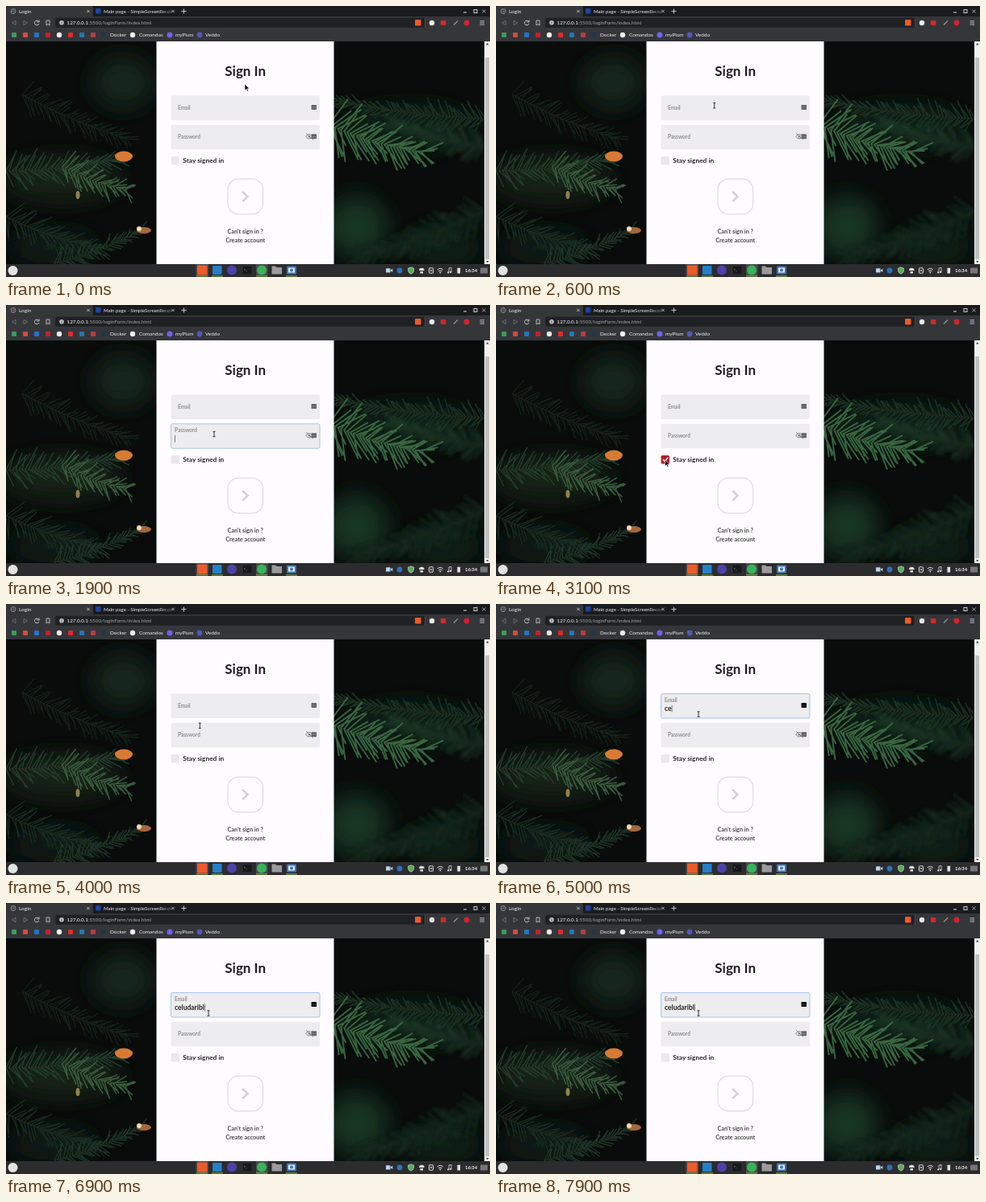
An HTML page for the animation above (8000 ms loop, 600 px wide and 337 px high).

```html
<!DOCTYPE html>
<html lang="en">
<head>
<meta charset="utf-8">
<title>Login</title>
<style>
  html, body { margin: 0; width: 100%; height: 100%; overflow: hidden; background: #090c0b; }
  svg { display: block; width: 100vw; height: 100vh; }
  text { font-family: Lato, "Open Sans", sans-serif; white-space: pre; }
</style>
</head>
<body>
<svg id="stage" viewBox="0 0 600 337" preserveAspectRatio="none">
  <defs>
    <clipPath id="photoArea"><rect y="44" width="594" height="277"/></clipPath>
    <filter id="soft"><feGaussianBlur stdDeviation="2.2"/></filter>
    <filter id="slight"><feGaussianBlur stdDeviation=".6"/></filter>
    <filter id="haze" x="-50%" y="-50%" width="200%" height="200%"><feGaussianBlur stdDeviation="14"/></filter>
    <linearGradient id="tabFade" x1="188" x2="205" gradientUnits="userSpaceOnUse">
      <stop stop-color="#dcdde0"/><stop offset="1" stop-color="#dcdde0" stop-opacity=".4"/>
    </linearGradient>
  </defs>
  <g id="photo" clip-path="url(#photoArea)"></g>
  <g id="chrome"></g>
  <g id="form"></g>
  <g id="taskbar"></g>
  <g id="pointer">
    <path id="arrow" d="M0 0V8L1.9 6.3L3.2 9L4.5 8.4L3.2 5.8H5.6Z" fill="#111" stroke="#fff" stroke-width=".5"/>
    <path id="beam" d="M-1.5 -3.2H1.5M0 -3.2V3.2M-1.5 3.2H1.5" fill="none" stroke="#222" stroke-width=".9"/>
  </g>
</svg>
<script>
const LOOP = 8000;
const byId = id => document.getElementById(id);

function add(parent, tag, attrs, content) {
  const node = document.createElementNS('http://www.w3.org/2000/svg', tag);
  for (const key in attrs) node.setAttribute(key, attrs[key]);
  if (content !== undefined) node.textContent = content;
  parent.appendChild(node);
  return node;
}
const rect = (g, x, y, width, height, fill, rx = 0, more = {}) =>
  add(g, 'rect', { x, y, width, height, fill, rx, ...more });
const disc = (g, cx, cy, r, fill, more = {}) => add(g, 'circle', { cx, cy, r, fill, ...more });
const line = (g, d, stroke, width = 1, more = {}) =>
  add(g, 'path', { d, fill: 'none', stroke, 'stroke-width': width, ...more });
const label = (g, x, y, size, fill, content, weight = 400, more = {}) =>
  add(g, 'text', { x, y, 'font-size': size, fill, 'font-weight': weight, ...more }, content);

// Photo backdrop
let seed = 11;
function random() {
  seed = (seed * 16807) % 2147483647;
  return seed / 2147483647;
}

function branch(parent, x1, y1, x2, y2, length, color, width, filter) {
  const g = add(parent, 'g', { filter: `url(#${filter})` });
  const heading = Math.atan2(y2 - y1, x2 - x1);
  const count = Math.round(Math.hypot(x2 - x1, y2 - y1) / 4);
  line(g, `M${x1} ${y1}Q${(x1 + x2) / 2} ${(y1 + y2) / 2 + 8} ${x2} ${y2}`, '#241f18', 1.4);
  let needles = '';
  for (let i = 0; i <= count; i++) {
    const u = i / count;
    const x = x1 + (x2 - x1) * u, y = y1 + (y2 - y1) * u + 4 * Math.sin(u * Math.PI);
    for (const side of [-1, 1]) {
      const angle = heading + side * (1 - 0.5 * u + (random() - 0.5) * 0.6);
      const reach = length * (1 - 0.35 * u) * (0.5 + random() * 0.6);
      needles += `M${x.toFixed(1)} ${y.toFixed(1)}l${(reach * Math.cos(angle)).toFixed(1)} ${(reach * Math.sin(angle)).toFixed(1)}`;
    }
  }
  line(g, needles, color, width, { 'stroke-linecap': 'round' });
}

function drawPhoto(g) {
  rect(g, 0, 44, 594, 277, '#090c0b');
  const glow = (cx, cy, rx, ry, fill) => add(g, 'ellipse', { cx, cy, rx, ry, fill, filter: 'url(#haze)' });
  glow(145, 95, 38, 32, '#12251a');
  glow(70, 215, 75, 28, '#122219');
  glow(60, 300, 55, 20, '#0f1d15');
  glow(500, 150, 80, 26, '#112218');
  glow(435, 275, 38, 38, '#183520');
  glow(540, 300, 50, 22, '#102318');
  branch(g, 594, 140, 412, 118, 24, '#1a3021', 1.6, 'slight');
  branch(g, 594, 175, 480, 145, 26, '#1d3826', 1.8, 'soft');
  branch(g, 594, 255, 440, 310, 32, '#12281a', 2.4, 'soft');
  branch(g, 20, 110, 150, 165, 26, '#14241b', 1.1, 'slight');
  branch(g, 0, 205, 140, 190, 30, '#233c2a', 1.4, 'slight');
  branch(g, 70, 200, 148, 228, 26, '#395b3d', 1.5, 'slight');
  branch(g, 0, 262, 110, 300, 30, '#182c20', 1.3, 'slight');
  branch(g, 60, 320, 165, 280, 22, '#1f3626', 1.3, 'slight');
  branch(g, 400, 148, 515, 182, 42, '#376540', 1.9, 'slight');
  add(g, 'ellipse', { cx: 146, cy: 187, rx: 11, ry: 6.5, fill: '#d97a34', filter: 'url(#slight)' });
  add(g, 'ellipse', { cx: 89, cy: 235, rx: 2.5, ry: 5, fill: '#94804f', filter: 'url(#slight)' });
  add(g, 'ellipse', { cx: 171, cy: 279, rx: 9, ry: 4, fill: '#a5683c', filter: 'url(#slight)' });
  disc(g, 165, 277, 3, '#ecd9b8');
}

// Browser window
function drawChrome(g) {
  rect(g, 0, 0, 600, 14, '#1a1b1e');
  rect(g, 0, 0, 108, 14, '#35363a', 2);
  rect(g, 0, 13, 600, 31, '#35363a');
  disc(g, 9, 6.5, 3, 'none', { stroke: '#8b8d91', 'stroke-width': 1 });
  line(g, 'M6 6.5H12M9 3.5V9.5', '#77797d', .6);
  label(g, 16, 9, 6.5, '#f0f0f2', 'Login');
  rect(g, 111, 3, 6.5, 6.5, '#1c469f', 1);
  label(g, 121, 9, 6.1, 'url(#tabFade)', 'Main page - SimpleScreenRecor', 500);
  const cross = (x, y, r) => line(g, `M${x - r} ${y - r}l${2 * r} ${2 * r}m0 ${-2 * r}l${-2 * r} ${2 * r}`, '#d5d6d9', .8);
  cross(102, 6.5, 1.7);
  cross(207, 6.5, 1.7);
  line(g, 'M217.5 6.5H223.5M220.5 3.5V9.5', '#d5d6d9', .9);
  line(g, 'M567 8H571', '#ddd', 1);
  rect(g, 580, 4.5, 4, 4, 'none', 0, { stroke: '#ddd', 'stroke-width': .9 });
  cross(592.5, 6.5, 1.9);

  line(g, 'M12 18.2V23.8L7.5 21Z', '#77797d', .8);
  line(g, 'M22 18.2V23.8L26.5 21Z', '#77797d', .8);
  line(g, 'M40.2 19A2.8 2.8 0 1 0 40.8 22M41 17.5V20H38.5', '#d8d9dc', .9);
  line(g, 'M50 18H54V24L52 22.5L50 24Z', '#d8d9dc', .8);
  rect(g, 61, 14.8, 458, 12, '#202124', 2);
  disc(g, 69, 20.8, 2.8, '#c6c7ca');
  line(g, 'M69 20.4V22.4M69 19.1V19.8', '#202124', .8);
  const url = label(g, 75.5, 23, 6.3, '#fff', '');
  add(url, 'tspan', {}, '127.0.0.1');
  add(url, 'tspan', { fill: '#a3a5a9' }, ':5500/loginForm/index.html');
  rect(g, 507, 17, 7.5, 7.5, '#ee5a2b', 1);
  line(g, 'M519.5 16V26', '#55575b', .6);
  disc(g, 528, 21, 3.2, '#eee');
  rect(g, 538.8, 18, 6.6, 6, '#cc2b2b', 1);
  line(g, 'M555 23.5L560 18.5', '#929498', 1.2);
  disc(g, 571, 21, 3.4, '#d3232b');
  for (const y of [18.8, 21, 23.2]) line(g, `M587.5 ${y}H593`, '#d8d9dc', .8);

  ['#3b9c58', '#d64b3f', '#2374c6', '#c5202b', '#eee', '#e02a2a', '#2278b5', '#b63d46', '#1d394c']
    .forEach((fill, i) => {
      const x = i < 8 ? 10 + 14 * i : 121;
      fill === '#eee' ? disc(g, x, 36, 3.2, fill) : rect(g, x - 3, 33, 6, 6, fill, 1);
    });
  disc(g, 157, 36, 3.2, '#eee');
  disc(g, 203, 36, 3.6, '#6c63e8');
  disc(g, 240, 36, 3.4, '#5059b8');
  [[129, 'Docker'], [165, 'Comandos'], [210, 'myPlum'], [247, 'Veddo']]
    .forEach(([x, name]) => label(g, x, 38.2, 6.4, '#f0f0f2', name));

  rect(g, 593, 44, 7, 277, '#f1f1f1');
  rect(g, 594, 64, 5, 251, '#c1c1c1');
  add(g, 'path', { d: 'M595 48.5L596.8 46L598.6 48.5ZM595 317L596.8 319.3L598.6 317Z', fill: '#444' });
}

// Sign-in form
function makeField(g, y, name) {
  const box = rect(g, 204.5, y, 184.5, 30.5, '#edecee', 2, { 'stroke-width': .8 });
  const tag = label(g, 0, 0, 6.5, '#8d8c91', name, 700);
  if (name === 'Password') {
    line(g, `M371.5 ${y + 14.5}Q376 ${y + 9} 380.5 ${y + 14.5}Q376 ${y + 20} 371.5 ${y + 14.5}M372 ${y + 10.5}L380.5 ${y + 18.5}`, '#85858a', 1);
    disc(g, 376, y + 14.5, 1.4, '#85858a');
  }
  const badge = rect(g, 378.5, y + 11.5, 6.5, 6, '#646468', .8);
  for (const x of [380.2, 381.8, 383.4]) disc(g, x, y + 14.6, .45, '#ddd');
  const typed = label(g, 209, y + 21.7, 8.5, '#222', '', 700);
  const caret = rect(g, 209, y + 14, .6, 9, '#333');
  return { y, box, tag, badge, typed, caret };
}

const form = byId('form');
rect(form, 186.5, 44, 220, 277, '#fefcfe');
const centered = { 'text-anchor': 'middle' };
label(form, 296.7, 87, 17, '#1d1d1d', 'Sign In', 700, centered);
const email = makeField(form, 111.5, 'Email');
const password = makeField(form, 147.8, 'Password');
const box = rect(form, 204.6, 187, 10.4, 10.4, '#e9e8ea', 1.5);
const tick = line(form, 'M207 192L209.3 194.6L213.2 189.6', '#fff', 1.4);
label(form, 219.3, 195, 8.4, '#222', 'Stay signed in', 700);
rect(form, 275, 215.2, 43.6, 43.6, 'none', 13, { stroke: '#dddce0', 'stroke-width': 1.2 });
line(form, 'M293.2 230.8L299.4 237L293.2 243.2', '#d2d1d5', 2.6);
label(form, 296.7, 283, 7.3, '#444', "Can't sign in ?", 700, centered);
label(form, 296.7, 294.3, 7.3, '#444', 'Create account', 700, centered);

// Desktop panel
function drawTaskbar(g) {
  rect(g, 0, 321, 600, 16, '#2c2c2f');
  disc(g, 8.5, 329, 6, '#e3e3e3');
  rect(g, 235.5, 321, 15.5, 15, '#4a4a4d');
  rect(g, 237, 322.5, 12.5, 12, '#ee5a2b', 1);
  rect(g, 256, 323, 11.5, 11, '#2580c9', 1);
  disc(g, 280, 328.5, 6, '#4c42a8');
  rect(g, 293, 323.2, 12, 10.6, '#17191c', 1, { stroke: '#3a3c40', 'stroke-width': .6 });
  label(g, 294.5, 328.5, 4.5, '#ddd', '>_');
  rect(g, 310, 321, 14.5, 15, '#4a4a4d');
  disc(g, 317, 328.5, 6, '#37b35b');
  add(g, 'path', { d: 'M329.5 323.5H334L335.5 325H342V333.5H329.5Z', fill: '#9b9b9d' });
  rect(g, 348, 323.5, 12, 10, '#3d76b8', 1.2);
  rect(g, 350, 325.5, 8, 6, '#dce7f2', .5);
  disc(g, 354, 328.5, 2, '#3d76b8');
  for (const x of [236, 255, 310, 347]) rect(g, x, 335.3, 14, 1.2, '#79aa45');

  rect(g, 471, 326.2, 5.5, 5.4, '#b8d3ec', .7);
  add(g, 'path', { d: 'M477 328.2L479.3 326.8V331L477 329.6Z', fill: '#b8d3ec' });
  disc(g, 488, 329, 3.4, '#2e73b9');
  add(g, 'path', { d: 'M502 324.8L505.5 326V329.5Q505 332 502 333.2Q499 332 498.5 329.5V326Z', fill: '#58ad5a', stroke: '#ddd', 'stroke-width': .6 });
  add(g, 'path', { d: 'M512 329A3.3 3.3 0 0 1 518.6 329ZM513.5 330H517V332.5H513.5Z', fill: '#e3e3e3' });
  rect(g, 524.5, 325.8, 5, 6.4, 'none', .6, { stroke: '#e3e3e3', 'stroke-width': 1 });
  disc(g, 527, 329, 1, '#e3e3e3');
  line(g, 'M534.8 328Q538.3 324.8 541.8 328M536.2 329.8Q538.3 327.9 540.4 329.8', '#e3e3e3', 1);
  disc(g, 538.3, 331.4, .9, '#e3e3e3');
  line(g, 'M549 331.5V326L552 325.5V330.8', '#e3e3e3', .8);
  disc(g, 548.2, 331.4, 1.1, '#e3e3e3');
  disc(g, 551.2, 330.9, 1.1, '#e3e3e3');
  rect(g, 559.5, 325.8, 3.6, 6.6, '#e3e3e3', .5);
  label(g, 569, 331.2, 5.9, '#f4f4f4', '16:34', 700);
  rect(g, 588, 325.5, 9, 7, '#77777a', .7);
}

drawPhoto(byId('photo'));
drawChrome(byId('chrome'));
drawTaskbar(byId('taskbar'));

// Timeline
const path = [[0, 296, 97], [300, 296, 97], [750, 262, 133], [1100, 261, 134], [1250, 261, 134],
  [1550, 258, 160.5], [2300, 258, 160.5], [2750, 209.5, 192.5], [3600, 209.5, 192.5], [4200, 251, 137]];
const focusSpans = { email: [[800, 1600], [4300, LOOP]], password: [[1600, 2850]] };
const login = 'celudaribl';
const keyTimes = [4850, 4980, 5150, 5300, 5450, 5600, 5780, 5950, 6250, 6500];
const clamp = v => Math.min(1, Math.max(0, v));
const ease = u => u * u * (3 - 2 * u);

function pointerAt(t) {
  const i = path.findIndex(p => p[0] > t);
  if (i < 0) return path[path.length - 1].slice(1);
  const [t0, x0, y0] = path[i - 1], [t1, x1, y1] = path[i];
  const u = ease((t - t0) / (t1 - t0));
  return [x0 + (x1 - x0) * u, y0 + (y1 - y0) * u];
}

function updateField(field, spans, t, content, lastKey) {
  const span = spans.find(([from, to]) => t >= from && t < to);
  const lift = Math.max(...spans.map(([from, to]) => ease(clamp((t - from) / 150)) * (1 - ease(clamp((t - to) / 150)))));
  field.box.setAttribute('stroke', span ? '#92b6ec' : 'none');
  field.tag.setAttribute('x', 213 - 4 * lift);
  field.tag.setAttribute('y', field.y + 17.3 - 7 * lift);
  field.badge.setAttribute('fill', span && field === email ? '#08080a' : '#646468');
  field.typed.textContent = content;
  const lit = span && (t - Math.max(span[0], lastKey)) % 1000 < 500;
  field.caret.setAttribute('visibility', lit ? 'visible' : 'hidden');
  field.caret.setAttribute('x', 209 + (content ? field.typed.getComputedTextLength() + .2 : 0));
}

function render(t) {
  const typedCount = keyTimes.filter(k => k <= t).length;
  updateField(email, focusSpans.email, t, login.slice(0, typedCount), keyTimes[typedCount - 1] || 0);
  updateField(password, focusSpans.password, t, '', 0);

  const checked = t >= 2850 && t < 3500;
  box.setAttribute('fill', checked ? '#b31c2b' : '#e9e8ea');
  tick.setAttribute('visibility', checked ? 'visible' : 'hidden');

  const [x, y] = pointerAt(t);
  const overField = x > 205 && x < 389 && [email, password].some(f => y > f.y && y < f.y + 30.5);
  byId('pointer').setAttribute('transform', `translate(${x} ${y})`);
  byId('arrow').setAttribute('visibility', overField ? 'hidden' : 'visible');
  byId('beam').setAttribute('visibility', overField ? 'visible' : 'hidden');
}

const start = performance.now();
function tickFrame() {
  render((performance.now() - start) % LOOP);
  requestAnimationFrame(tickFrame);
}
tickFrame();
</script>
</body>
</html>
```
